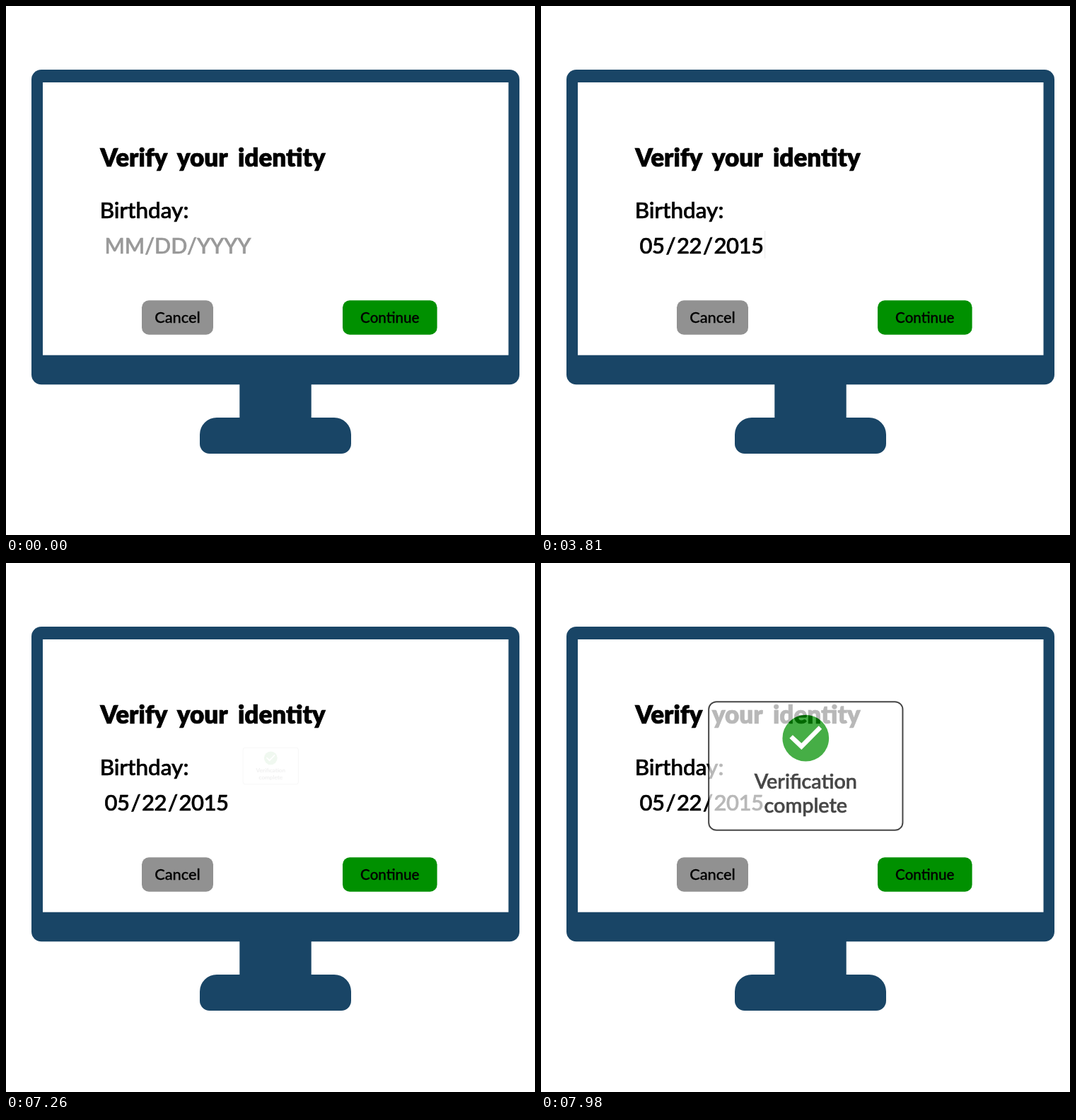
An HTML page that plays this animation: 748 px wide and 748 px high, repeating every 8000 ms.

```html
<!DOCTYPE html>
<html lang="en">
<head>
<meta charset="utf-8">
<title>Verify your identity</title>
<style>
  html, body { margin: 0; width: 100%; height: 100%; overflow: hidden; background: #fff; }
  svg { display: block; width: 100vw; height: 100vh; }
  text { font-family: Lato, "Open Sans", sans-serif; font-weight: 500; text-anchor: middle; stroke: #000; stroke-width: .7; }
  .title { font-weight: 900; word-spacing: 7px; }
  .hint { fill: #999; stroke: #999; }
  .small { stroke-width: .3; }
</style>
</head>
<body>
<svg viewBox="0 0 748 748">
  <g fill="#194566">
    <rect x="36" y="90" width="690" height="445.3" rx="14"/>
    <rect x="330.3" y="530" width="101.4" height="60"/>
    <path d="M298 582H464a24 24 0 0 1 24 24V619a14 14 0 0 1-14 14H288a14 14 0 0 1-14-14V606a24 24 0 0 1 24-24z"/>
  </g>
  <rect x="52" y="108" width="658.5" height="385.7" fill="#fff"/>

  <text class="title" x="292.5" y="227" font-size="35">Verify your identity</text>
  <text x="195.5" y="300" font-size="31.5">Birthday:</text>
  <text id="hint" class="hint" x="243" y="350" font-size="30.4">MM/DD/YYYY</text>
  <text id="date" y="350" font-size="31"></text>
  <rect id="caret" y="318" width="1.3" height="39"/>

  <rect x="192" y="416.3" width="101" height="48.4" rx="10" fill="#919191"/>
  <text class="small" x="242.5" y="448" font-size="21.8">Cancel</text>
  <g id="button">
    <rect x="-66.8" y="-24.2" width="133.6" height="48.4" rx="10" fill="#009000"/>
    <text class="small" y="7.5" font-size="20.6">Continue</text>
  </g>

  <g id="popup">
    <rect x="-137.7" y="-91.2" width="275.4" height="182.4" rx="11" fill="#fff" stroke="#000" stroke-width="2"/>
    <circle cy="-39.5" r="33" fill="#009000"/>
    <path d="M-23-39.5L-6-23 23-52.5 18.5-57-6-32.5-18.5-44z" fill="#fff"/>
    <text y="32" font-size="28.9">Verification</text>
    <text y="66" font-size="28.9">complete</text>
  </g>
</svg>
<script>
const LOOP = 8000, STEP = 30, ADVANCE = 17.5;
const DATE = '05/22/2015';
const KEY_TIMES = [1680, 1830, 2070, 2190, 2430, 2640, 2730, 2940, 3090, 3270];
const [hint, date, caret, button, popup] =
  ['hint', 'date', 'caret', 'button', 'popup'].map(id => document.getElementById(id));

const progress = (t, start, end) => Math.min(1, Math.max(0, (t - start) / (end - start)));
const place = (node, x, y, scale) =>
  node.setAttribute('transform', `translate(${x} ${y}) scale(${scale})`);

date.setAttribute('x', [...DATE].map((_, i) => 148.5 + ADVANCE * i).join(' '));

function drawField(t) {
  const typed = KEY_TIMES.filter(time => time <= t).length;
  const fadeIn = progress(t, 1110, 1590);
  const fadeOut = t < 5220 ? Math.max(.07, 1 - progress(t, 3375, 3845)) : 0;
  hint.setAttribute('opacity', 1 - fadeIn);
  date.textContent = DATE.slice(0, typed);
  caret.setAttribute('x', 141 + ADVANCE * typed);
  caret.setAttribute('opacity', .85 * fadeIn * fadeOut);
}

// One damped swing: grow, shrink, return to rest.
function drawButton(t) {
  const u = progress(t, 5200, 6090);
  place(button, 542.8, 440.5, 1 + .116 * Math.exp(-.63 * u) * Math.sin(2 * Math.PI * u));
}

// Springs open past its size, then shrinks while still fading in.
function drawPopup(t) {
  const peak = 7450;
  const width = t < peak
    ? 326 * Math.sin(Math.PI / 2 * progress(t, 7225, peak))
    : 326 - 177 * ((t - peak) / 1000) ** 2;
  place(popup, 374.3, 287, width / 277.4);
  popup.setAttribute('opacity', progress(t, 7200, 8280));
}

function draw() {
  const t = Math.floor(performance.now() % LOOP / STEP) * STEP;
  drawField(t);
  drawButton(t);
  drawPopup(t);
  requestAnimationFrame(draw);
}
draw();
</script>
</body>
</html>
```
